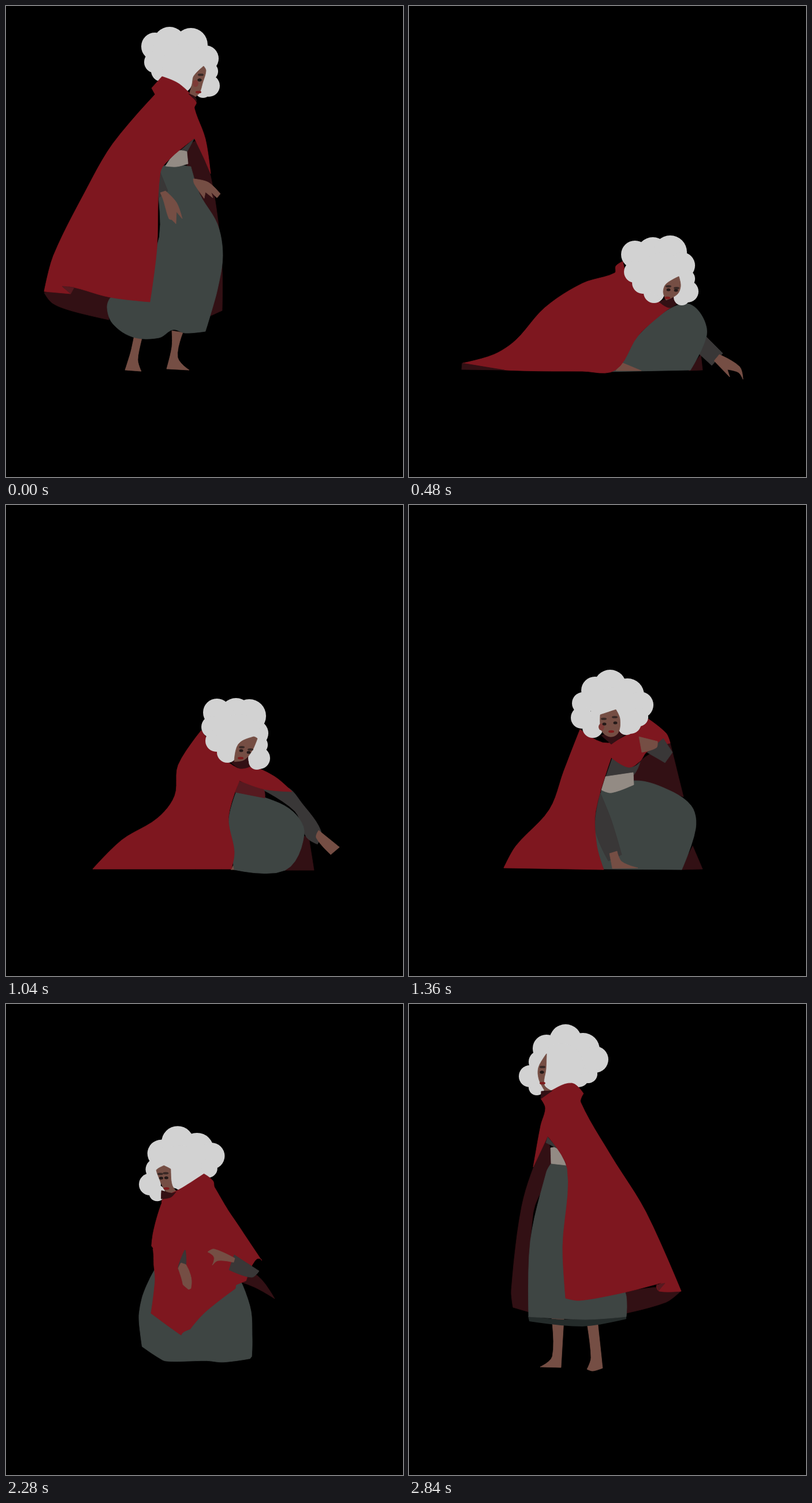
An HTML page that plays this animation: 687x815 px, repeating every 2920 ms.

```html
<!DOCTYPE html>
<html lang="en">
<head>
<meta charset="utf-8">
<title>Red cape</title>
<style>
html, body { margin: 0; width: 100%; height: 100%; overflow: hidden; background: #000; }
svg { display: block; }
#stage { stroke-width: .8; stroke-linejoin: round; }
.cape { fill: #7e171f; stroke: #7e171f; }
.capeIn, .capeLow, .capeUp, .capeL, .collar { fill: #321014; stroke: #321014; }
.fold { fill: #561a20; stroke: #561a20; }
.skirt { fill: #3e4543; stroke: #3e4543; }
.hem { fill: #242b2a; }
.belt { fill: #938b84; stroke: #938b84; }
.shirt, .sleeve, .sleeveR { fill: #393737; stroke: #393737; }
.handL, .handR, .legL, .legR, .face { fill: #754e44; stroke: #754e44; }
.hair { fill: #d2d2d2; }
.brow { fill: #382825; }
.eye { fill: #241918; }
.lips { fill: #7d1b1c; }
.blush { fill: #7d3b37; }
</style>
</head>
<body>
<svg width="687" height="815" viewBox="0 0 687 815">
<defs>
<!-- Key poses, back to front. Hair holds curl centres, look holds the features. -->
<g class="pose" data-at="0">
  <polygon class="capeIn" points="310 250 327 234 345 260 364 350 374 455 374 527 354 536 340 400"/>
  <polygon class="capeLow" points="66 496 118 487 180 504 178 543 115 528 80 514"/>
  <polygon class="legL" points="222 570 236 572 228 612 234 632 206 630 216 598"/>
  <polygon class="legR" points="287 562 306 565 297 608 317 630 278 628 287 590"/>
  <polygon class="skirt" points="275 276 320 278 335 325 366 378 375 432 366 490 353 537 345 563 310 566 289 560 265 574 220 573 185 550 175 522 182 503 260 420 264 290"/>
  <polygon class="shirt" points="302 250 326 229 313 253"/>
  <polygon class="belt" points="276 277 297 251 313 252 315 273 295 278"/>
  <polygon class="sleeveR" points="267 288 280 320 264 332"/>
  <polygon class="handR" points="267 323 276 320 295 340 305 368 295 356 294 377 287 370 282 368 272 335"/>
  <polygon class="handL" points="324 299 350 305 371 325 365 332 355 322 358 332 345 322 343 333 326 308"/>
  <polyline class="hair" points="258 70 258 97 270 112 283 64 320 67 345 91 351 113 351 138 341 145 304 132"/>
  <polygon class="face" points="342 104 346 112 340 134 335 150 328 157 317 153 322 135 325 121"/>
  <polyline class="look" points="337 119 335 128 333 149 337 119 335 128 328 134"/>
  <polygon class="cape" points="270 122 300 135 329 166 326 177 345 230 354 290 342 262 326 229 285 263 267 288 261 420 249 512 180 504 118 487 97 485 112 498 66 494 82 432 135 325 185 238 258 153 252 142"/>
  <polygon class="collar" points="316 152 327 157 330 165"/>
  <polygon class="fold" points="97 485 118 487 112 498"/>
</g>
<g class="pose" data-at="480">
  <polygon class="capeIn" points="505 603 508 630 484 631"/>
  <polygon class="sleeve" points="514 572 543 601 524 622 500 600"/>
  <polygon class="handL" points="537 603 572 624 578 646 570 634 551 629 555 642 528 614"/>
  <polygon class="skirt" points="440 531 480 515 505 533 515 570 487 630 340 633 397 570"/>
  <polygon class="handR" points="368 617 402 631 358 631"/>
  <polygon class="cape" points="370 442 380 470 435 512 462 516 440 531 396 571 357 630 300 632 150 629 93 618 147 603 185 578 235 522 300 480 356 462 358 450"/>
  <polygon class="capeLow" points="92 618 165 630 91 629"/>
  <polygon class="collar" points="433 512 464 498 464 515 450 522"/>
  <polyline class="hair" points="391 430 391 460 405 479 422 428 452 426 472 449 479 472 482 494 472 504 424 496"/>
  <polygon class="face" points="445 481 467 468 470 485 464 499 445 509 440 495"/>
  <polyline class="look" points="449 485 449 491 447 505 463 488 462 492"/>
</g>
<g class="pose" data-at="1040">
  <polygon class="capeIn" points="516 573 524 575 533 632 482 632"/>
  <polygon class="handR" points="394 623 405 631 389 631"/>
  <polygon class="sleeve" points="443 492 485 488 512 516 545 564 539 587 520 575 500 530"/>
  <polygon class="handL" points="541 563 577 592 562 605 537 576"/>
  <polygon class="skirt" points="398 497 447 506 497 531 516 570 483 632 395 631 385 548"/>
  <polygon class="fold" points="403 478 445 492 448 507 397 497"/>
  <polygon class="cape" points="338 390 365 425 400 455 424 452 465 470 495 496 447 492 404 477 385 540 395 600 390 630 150 630 200 580 262 542 292 503 298 450"/>
  <polygon class="collar" points="389 445 423 432 424 452 405 456"/>
  <polyline class="hair" points="365 359 357 384 364 408 398 362 421 365 431 395 437 415 438 438 434 444 383 428"/>
  <polygon class="face" points="402 414 428 401 435 404 426 425 412 441 395 444"/>
  <polyline class="look" points="408 419 407 425 406 438 423 423 420 428"/>
</g>
<g class="pose" data-at="1360">
  <polygon class="capeIn" points="491 590 508 630 470 631"/>
  <polygon class="capeUp" points="400 443 452 412 475 505 386 475"/>
  <polygon class="skirt" points="333 493 390 477 440 489 488 520 496 560 472 631 337 630 322 580"/>
  <polygon class="shirt" points="352 437 386 453 400 445 385 470 340 472"/>
  <polygon class="belt" points="340 470 388 463 389 484 350 498 333 493"/>
  <polygon class="sleeveR" points="331 498 350 545 368 605 345 616 322 560"/>
  <polygon class="handR" points="347 603 360 599 368 617 396 628 352 629"/>
  <polygon class="cape" points="296 388 345 412 414 370 445 395 452 412 412 427 400 443 380 454 350 437 323 530 325 590 337 631 164 628 185 590 243 527 268 460"/>
  <polygon class="collar" points="333 399 366 388 377 395 350 414"/>
  <polygon class="sleeve" points="412 428 440 404 456 428 443 446"/>
  <polygon class="handL" points="398 401 430 409 428 420 403 428"/>
  <polyline class="hair" points="322 321 301 343 299 368 348 313 378 329 400 346 398 367 383 377 376 384 318 385"/>
  <polygon class="face" points="331 363 358 354 365 370 362 394 348 401 333 390"/>
  <polyline class="look" points="337 370 338 379 350 392 356 367 357 377 333 384"/>
</g>
<g class="pose" data-at="1920">
  <polygon class="capeIn" points="455 490 478 540 494 631 455 631"/>
  <polygon class="capeUp" points="376 445 435 470 465 510 430 490 372 469"/>
  <polygon class="capeL" points="310 435 308 480 288 478"/>
  <polygon class="skirt" points="310 477 340 487 375 468 430 487 471 548 464 605 455 632 404 634 253 629 258 545 297 474"/>
  <polygon class="shirt" points="314 430 345 457 308 455"/>
  <polygon class="belt" points="308 449 345 457 376 452 375 469 340 487 310 477"/>
  <polyline class="hair" points="285 318 280 345 268 366 309 294 345 304 374 312 371 334 350 345 281 382 335 358"/>
  <polygon class="face" points="283 345 316 340 316 368 321 378 309 383 295 373"/>
  <polyline class="look" points="289 350 291 357 305 374 306 348 307 356"/>
  <polygon class="cape" points="362 346 382 357 410 415 459 495 415 438 385 440 360 459 314 428 272 510 253 580 256 631 176 628 215 548 242 510 255 445 290 392 327 373"/>
  <polygon class="collar" points="288 370 309 383 321 378 310 390 288 388"/>
  <polygon class="sleeve" points="395 434 438 462 425 473 386 460"/>
  <polygon class="handL" points="349 429 360 424 396 440 394 447 367 444 357 452 360 438"/>
  <polygon class="sleeveR" points="295 474 290 495 278 503"/>
  <polygon class="handR" points="290 486 310 497 321 515 311 532 298 510 284 494"/>
</g>
<g class="pose" data-at="2520">
  <polygon class="capeLow" points="390 590 506 566 475 590 390 604 232 603"/>
  <polygon class="capeIn" points="272 311 262 370 249 382 254 355"/>
  <polygon class="legL" points="246 598 264 598 263 629 227 628 243 616"/>
  <polygon class="legR" points="367 600 385 595 393 609 383 628 356 630 370 615"/>
  <polygon class="skirt" points="276 340 308 341 331 362 360 490 390 590 340 602 312 597 250 602 232 597 206 520 201 485 225 415 250 380"/>
  <polygon class="shirt" points="272 311 282 330 267 346"/>
  <polygon class="belt" points="279 325 290 320 309 338 290 343"/>
  <polygon class="sleeveR" points="329 362 338 400 332 411 320 400"/>
  <polygon class="handR" points="318 399 326 401 321 432 327 447 309 443"/>
  <polyline class="hair" points="248 184 236 212 225 244 282 170 312 186 332 201 323 222 310 225 237 258 268 238"/>
  <polygon class="face" points="240 200 245 213 250 242 262 256 246 258 238 235 231 212"/>
  <polyline class="look" points="239 223 240 231 243 250 239 223 240 231 245 238"/>
  <polygon class="cape" points="318 228 331 245 328 257 385 328 460 442 506 566 430 576 390 593 360 490 331 362 300 330 272 311 254 360 249 280 243 274 262 257"/>
  <polygon class="collar" points="246 262 262 256 244 273"/>
</g>
<g class="pose" data-at="2840">
  <polygon class="capeIn" points="240 230 246 285 215 360 208 533 180 525 177 495 195 350 222 265"/>
  <polygon class="capeLow" points="433 490 470 497 445 516 376 535 374 498"/>
  <polygon class="legL" points="247 544 268 545 263 629 227 628 248 610"/>
  <polygon class="legR" points="307 546 326 546 335 630 318 635 308 632 315 612"/>
  <polygon class="hem" points="206 540 270 546 376 541 376 545 300 558 208 549"/>
  <polygon class="skirt" points="246 276 274 280 374 498 376 541 305 546 207 541 210 410 238 290"/>
  <polygon class="belt" points="245 249 256 249 272 279 246 276"/>
  <polygon class="shirt" points="240 230 257 250 237 240"/>
  <polyline class="hair" points="238 77 226 100 209 125 271 63 301 79 322 96 310 121 293 125 221 144 250 132"/>
  <polygon class="face" points="238 86 237 113 234 140 246 150 236 152 225 131 224 110"/>
  <polyline class="look" points="231 109 230 118 231 137 231 109 230 118"/>
  <polygon class="cape" points="282 137 302 155 297 170 348 260 410 360 471 497 433 497 428 488 438 482 373 499 295 513 271 509 266 420 274 285 240 229 215 282 228 210 236 180 228 164 246 150"/>
  <polygon class="collar" points="229 151 248 150 228 164"/>
  <polygon class="fold" points="428 486 443 483 432 496"/>
</g>
</defs>
<g id="stage"></g>
</svg>
<script>
const LOOP = 2920;
const CURLS = [24, 19, 19, 28, 29, 23, 16, 19, 14, 18];
const LOOK = [['brow', 5, 2], ['eye', 3.5, 2.5], ['lips', 5, 2.2], ['brow', 5, 2], ['eye', 3.5, 2.5], ['blush', 5, 6]];
const stage = document.getElementById('stage');

const smooth = u => u * u * (3 - 2 * u);
const EASE = [smooth, u => u, u => 1 - (1 - u) ** 3, smooth, u => u ** 1.6, u => 1 - (1 - u) ** 2.2];

// Drawn on twos, with longer holds in the middle.
const range = (from, to) => Array.from({ length: (to - from) / 80 + 1 }, (_, i) => from + i * 80);
const STEPS = [...range(0, 1200), 1360, 1440, 1600, 1760, 1920, 2120, ...range(2280, 2840)];

const mix = (a, b, u) => a + (b - a) * u;
const mixPoint = (p, q, u) => [mix(p[0], q[0], u), mix(p[1], q[1], u)];
const dist = (a, b) => Math.hypot(b[0] - a[0], b[1] - a[1]);
const unit = (a, b) => { const d = dist(a, b) || 1; return [(b[0] - a[0]) / d, (b[1] - a[1]) / d]; };
const mean = pts => [0, 1].map(j => pts.reduce((s, p) => s + p[j], 0) / pts.length);

function readPoints(el) {
  const v = el.getAttribute('points').split(' ').map(Number), pts = [];
  for (let i = 0; i < v.length; i += 2) pts.push([v[i], v[i + 1]]);
  return pts;
}

// Tangent of a smooth joint; a sharp turn keeps its corner.
function tangent(p, i) {
  const n = p.length, a = p[(i + n - 1) % n], b = p[i], c = p[(i + 1) % n];
  const d = unit(a, b), e = unit(b, c);
  return d[0] * e[0] + d[1] * e[1] < 0.45 ? [0, 0] : unit(a, c);
}

function outline(raw) {
  const n = raw.length, pts = [];
  const area = raw.reduce((s, p, i) => {
    const q = raw[(i + 1) % n];
    return s + p[0] * q[1] - q[0] * p[1];
  }, 0);
  if (area < 0) raw.reverse();
  raw.forEach((a, i) => {
    const b = raw[(i + 1) % n], len = dist(a, b), ta = tangent(raw, i), tb = tangent(raw, (i + 1) % n);
    for (let k = 0; k < 6; k++) {
      const t = k / 6, h = smooth(t), g = t * (1 - t) ** 2 * len, f = t * t * (t - 1) * len;
      pts.push([0, 1].map(j => mix(a[j], b[j], h) + g * ta[j] + f * tb[j]));
    }
  });
  const t = [0];
  pts.forEach((p, i) => t.push(t[i] + dist(p, pts[(i + 1) % pts.length])));
  return { pts, t: t.map(x => x / t[pts.length]) };
}

function pointAt({ pts, t }, s) {
  s -= Math.floor(s);
  let i = 0;
  while (i < pts.length - 1 && t[i + 1] <= s) i++;
  return mixPoint(pts[i], pts[(i + 1) % pts.length], (s - t[i]) / (t[i + 1] - t[i] || 1));
}

// Pairs two outlines point by point, starting where they fit best.
function pair(a, b) {
  const N = 48;
  const ring = shape => {
    const r = Array.from({ length: N }, (_, i) => pointAt(shape, i / N)), c = mean(r);
    return r.map(p => [p[0] - c[0], p[1] - c[1]]);
  };
  const ra = ring(a), rb = ring(b);
  let best = Infinity, shift = 0;
  for (let k = 0; k < N; k++) {
    const cost = ra.reduce((s, p, i) => s + dist(p, rb[(i + k) % N]) ** 2, 0);
    if (cost < best) { best = cost; shift = k / N; }
  }
  const marks = [...a.t, ...b.t.map(x => (x - shift + 1) % 1)].sort((x, y) => x - y);
  return marks.map(s => [pointAt(a, s), pointAt(b, s + shift)]);
}

const poses = [...document.querySelectorAll('.pose')].map(g => {
  const shapes = {};
  for (const el of g.children) {
    const name = el.getAttribute('class'), pts = readPoints(el);
    shapes[name] = el.tagName === 'polygon' ? outline(pts) : { pts };
  }
  return { at: +g.dataset.at, shapes, pairs: {} };
});
poses.slice(0, -1).forEach(({ shapes, pairs }, i) => {
  const next = poses[i + 1].shapes;
  for (const name in shapes) {
    const a = shapes[name], b = next[name];
    if (b) pairs[name] = a.t ? pair(a, b) : a.pts.map((p, k) => [p, b.pts[k]]).filter(pq => pq[1]);
  }
});

// The far arm sweeps low over the floor before it comes to rest.
function swing([x, y], u) {
  const reach = Math.min(1, Math.max(0, (x - 470) / 90)) * Math.sin(Math.PI * u);
  return [x + 28 * reach, y + 145 * reach];
}

const ellipse = (name, [x, y], rx, ry = rx) =>
  `<ellipse class="${name}" cx="${x}" cy="${y}" rx="${rx}" ry="${ry}"/>`;

function markup(name, pts) {
  if (name === 'hair') return [...pts, mean(pts)].map((p, i) => ellipse(name, p, CURLS[i] || 38)).join('');
  if (name === 'look') return pts.map((p, i) => ellipse(LOOK[i][0], p, LOOK[i][1], LOOK[i][2])).reverse().join('');
  return `<polygon class="${name}" points="${pts.map(p => p.map(v => v.toFixed(1))).join(' ')}"/>`;
}

function draw(time) {
  let i = poses.length - 1;
  while (poses[i].at > time) i--;
  const from = poses[i], to = poses[i + 1] || from;
  const u = to === from ? 0 : EASE[i]((time - from.at) / (to.at - from.at));
  const near = u < 0.5 ? from : to;
  stage.innerHTML = Object.keys(near.shapes).map(name => {
    const both = from.pairs[name];
    let pts = u && both ? both.map(([p, q]) => mixPoint(p, q, u)) : near.shapes[name].pts;
    if (i === 1 && (name === 'sleeve' || name === 'handL')) pts = pts.map(p => swing(p, u));
    return markup(name, pts);
  }).join('');
}

let shown = -1;
function tick() {
  const now = performance.now() % LOOP;
  const step = STEPS.filter(s => s <= now).pop();
  if (step !== shown) draw(shown = step);
  requestAnimationFrame(tick);
}
tick();
</script>
</body>
</html>
```
